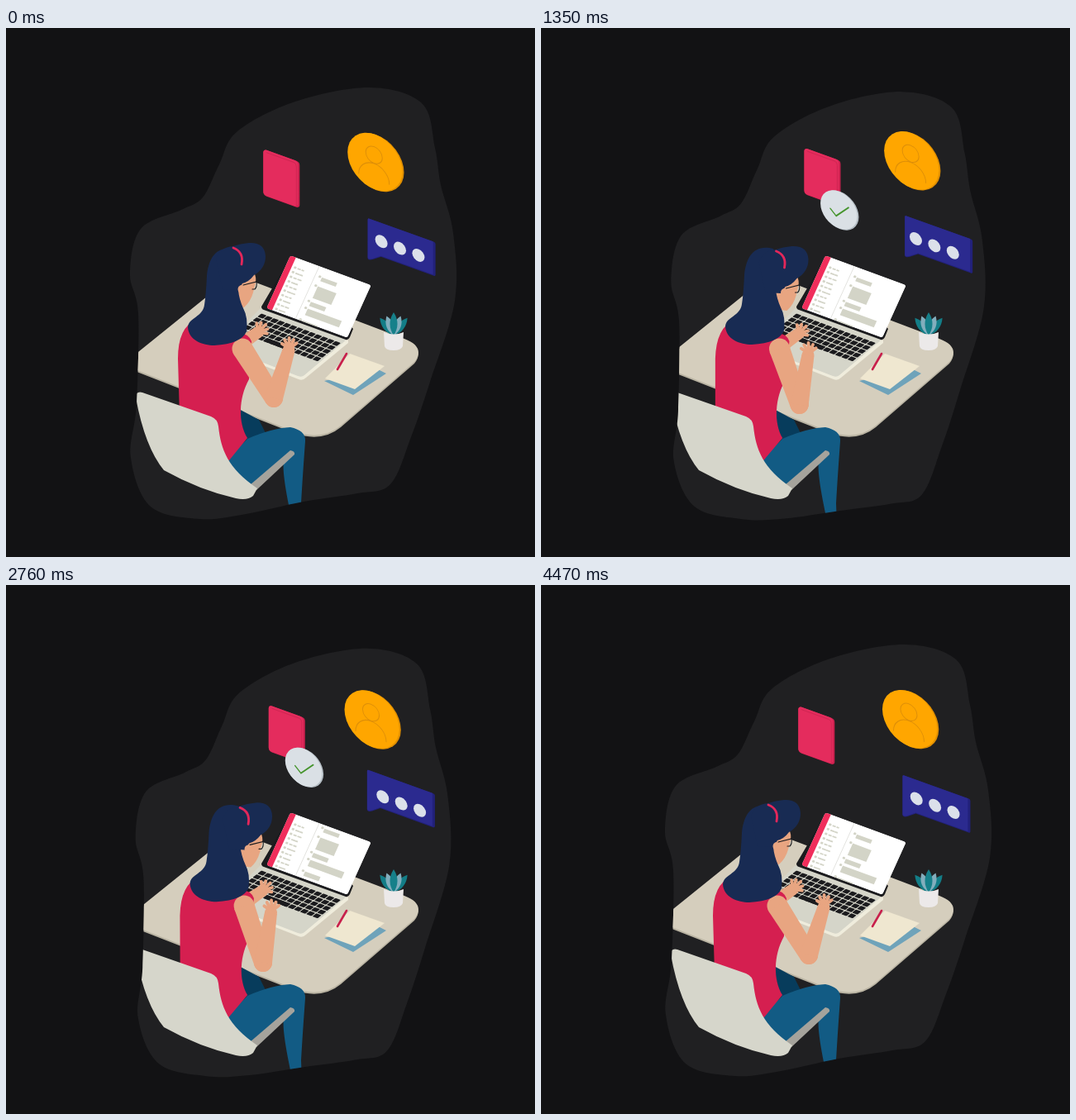
Write an HTML page with a canvas that moves like this. It is 640 px wide and 640 px high and loops after 4530 ms.

```html
<!DOCTYPE html>
<html lang="en">
<head>
<meta charset="utf-8">
<title>Working at a desk</title>
<style>
html, body { margin: 0; width: 100%; height: 100%; overflow: hidden; background: #121214; }
canvas { display: block; width: 640px; height: 640px; }
</style>
</head>
<body>
<canvas id="stage" width="640" height="640"></canvas>
<script>
const ctx = document.getElementById('stage').getContext('2d');
const LOOP = 4530, STEP = 30, LAST = 4470, SLOPE = 0.36;
const SKIN = '#e8a581', HAIR = '#182b53', CRIMSON = '#d51f50', GREY = '#d3d4c7', DARK = '#1b1b1e';

const mix = (a, b, x) => a + (b - a) * x;
const ease = (t, from, to) => {
  const x = Math.max(0, Math.min(1, (t - from) / (to - from)));
  return x * x * (3 - 2 * x);
};
const pulse = (t, a, b, c, d) => ease(t, a, b) - ease(t, c, d);
const drift = (t, peak) => Math.cos(2 * Math.PI * (t - peak) / LOOP);
const soft = x => (x + (1 - Math.cos(Math.PI * x)) / 2) / 2;
const swell = t => t < 1950 ? soft((t / 1950) ** 0.8) : soft((LAST - t) / (LAST - 1950));

function fill(path, color) {
  ctx.fillStyle = color;
  ctx.fill(new Path2D(path));
}
function stroke(path, color, width = 1) {
  ctx.strokeStyle = color;
  ctx.lineWidth = width;
  ctx.stroke(new Path2D(path));
}
function disc(x, y, r, color) {
  ctx.fillStyle = color;
  ctx.beginPath();
  ctx.arc(x, y, r, 0, 7);
  ctx.fill();
}
function rect(x, y, w, h, color, r = 0) {
  ctx.fillStyle = color;
  ctx.beginPath();
  ctx.roundRect(x, y, w, h, r);
  ctx.fill();
}
function layer(draw) {
  ctx.save();
  draw();
  ctx.restore();
}
function shifted(x, y, draw) {
  layer(() => { ctx.translate(x, y); draw(); });
}
// Places a flat drawing on the slanted plane of the floating items.
function slanted(x, y, draw, scale = 1) {
  if (scale <= 0) return;
  layer(() => {
    ctx.transform(scale, SLOPE * scale, 0, scale, x, y);
    draw();
  });
}

const OUTLINE = [[440, 72], [503, 91], [519, 145], [526, 190], [541, 248], [543, 330], [513, 428], [490, 495],
  [465, 552], [425, 563], [360, 573], [290, 588], [235, 594], [175, 579], [151, 520], [158, 455], [160, 345],
  [150, 297], [163, 243], [212, 220], [238, 205], [258, 165], [280, 125], [350, 89]];

// The blob narrows and sinks, while its lower left corner is held up.
function squeeze([x, y], w) {
  const corner = Math.exp(-((x - 205) ** 2 + (y - 590) ** 2) / 12100);
  return [x + w * ((347 - x) * 0.047 + 6 * corner), y + w * (5 + y / 50 - 18 * corner)];
}

function blobPath(w) {
  const points = OUTLINE.map(p => squeeze(p, w)), n = points.length;
  const at = i => points[(i + n) % n];
  const path = new Path2D();
  path.moveTo(...at(0));
  for (let i = 0; i < n; i++) {
    const out = k => at(i)[k] + (at(i + 1)[k] - at(i - 1)[k]) / 6;
    const into = k => at(i + 1)[k] - (at(i + 2)[k] - at(i)[k]) / 6;
    path.bezierCurveTo(out(0), out(1), into(0), into(1), ...at(i + 1));
  }
  return path;
}

function drawDesk() {
  const top = 'M130 416L274 300Q282 296 292 304L482 376Q508 386 494 404L405 481Q382 500 348 488L130 403Z';
  shifted(0, 2, () => fill(top, '#b9b3a2'));
  fill(top, '#d5cebd');
}

function drawScreen(scroll) {
  fill('M343 279L309 337Q309 340 312 341L411 377Q414 378 416 374L420 364Z', DARK);
  layer(() => {
    ctx.transform(0.98, 0.36, -0.29, 0.64, 344, 275);
    ctx.beginPath();
    ctx.roundRect(0, 0, 100, 100, 4);
    ctx.clip();
    rect(0, 0, 100, 100, '#ffffff');
    rect(0, 0, 7, 100, '#f02e5c');
    rect(35.5, 0, 0.8, 100, '#dfdfdb');
    for (let i = 0; i < 10; i++) {
      const y = 15 + i * 8.7;
      rect(9.5, y, 3, 4, GREY, 1);
      rect(14, y + 1, 4 + i % 2, 2.5, GREY);
      rect(19, y + 1, 3 + i % 3, 2.5, GREY);
    }
    ctx.translate(0, -scroll);
    [[17, 19, 7], [34, 23, 22], [63, 19, 8], [76, 42, 12], [98, 19, 8]].forEach(([y, w, h]) => {
      rect(40, y - 2, 3, 4, GREY, 1);
      rect(44, y, w, h, GREY);
    });
  });
}

function drawLaptop(scroll) {
  fill('M308 340L414 378V381L363 423Q359 427 354 425L262 389V384Z', '#efecdc');
  fill('M308 339L412 377L361 420Q358 423 353 421L262 386Z', '#d5d5c9');
  layer(() => {
    ctx.transform(97 / 13, 36 / 13, -29 / 5, 23 / 5, 309, 345);
    for (let row = 0; row < 5; row++) {
      for (let col = 0; col < 13; col++) rect(col + 0.06, row + 0.08, 0.86, 0.82, DARK, 0.12);
    }
    rect(4.06, 4.08, 3.86, 0.82, DARK, 0.12);
  });
  drawScreen(scroll);
}

function drawPlant() {
  const leaf = (degrees, length, color) => shifted(469, 372, () => {
    ctx.rotate(degrees * Math.PI / 180);
    fill(`M0 0Q-9 ${-length / 2} 0 ${-length}Q9 ${-length / 2} 0 0Z`, color);
  });
  for (const side of [-1, 1]) {
    leaf(38 * side, 27, '#137d87');
    leaf(20 * side, 25, '#82aebd');
  }
  leaf(0, 28, '#16808a');
  fill('M457 368Q469 373 481 368L480 385Q478 390 469 390Q459 390 458 385Z', '#ece9e9');
}

function drawPapers() {
  fill('M385 427L420 444L460 418L448 412Z', '#6fa3ba');
  fill('M416 394L458 409L422 437L386 424Z', '#efe7d0');
  stroke('M412 394L401 413', '#c8204c', 2.6);
}

function limb(x1, y1, r1, x2, y2, r2) {
  const a = Math.atan2(y2 - y1, x2 - x1), nx = -Math.sin(a), ny = Math.cos(a);
  disc(x1, y1, r1, SKIN);
  disc(x2, y2, r2, SKIN);
  fill(`M${x1 + nx * r1} ${y1 + ny * r1}L${x2 + nx * r2} ${y2 + ny * r2}`
    + `L${x2 - nx * r2} ${y2 - ny * r2}L${x1 - nx * r1} ${y1 - ny * r1}Z`, SKIN);
}
// Fans five fingers out around a main direction.
function fingers(x, y, direction) {
  for (let i = -2; i <= 2; i++) {
    const a = (direction + i * 27) * Math.PI / 180, length = 13 - Math.abs(i);
    stroke(`M${x} ${y}l${length * Math.cos(a)} ${length * Math.sin(a)}`, SKIN, 3.8);
  }
}

function drawFarHand(lean) {
  const x = 305 + 6.5 * lean, y = 368 + 2 * lean;
  limb(x - 16, y + 11, 8, x, y, 7);
  fingers(x, y, -45);
}

function drawNearArm(t, lean) {
  const lift = pulse(t, 950, 1450, 2800, 3250);
  const elbowX = mix(324 + 2.5 * lean, 311, lift), elbowY = mix(448, 457, lift);
  const wristX = mix(343 + 2.5 * lean, 321.5, lift), wristY = mix(388 + lean, 394.5, lift);
  limb(286 + 2.5 * lean, 388, 12.5, elbowX, elbowY, 11);
  limb(elbowX, elbowY, 11, wristX - 1, wristY + 2, 7.5);
  fingers(wristX, wristY, -92);
}

function drawLegs() {
  fill('M280 460L306 474L314 490L290 498Z', '#073c5c');
  fill('M266 523L292 497Q322 484 344 483Q363 487 362 500Q359 540 357 575L358 602H347L341 572Q334 535 336 524L296 555Z', '#125b84');
}

function drawTorso(lean) {
  layer(() => {
    const shear = lean / 35;
    ctx.transform(1, 0, -shear, 1, shear * 500, 0);
    fill('M230 353Q208 362 208 400L210 470L250 520L270 523L292 496C281 478 281 448 294 425L297 379Q294 370 280 368Z', CRIMSON);
  });
}

function drawChair() {
  fill('M295 553L344 511Q350 512 349 516L303 559Z', '#a5a39c');
  fill('M157 447Q157 439 165 441L248 470Q256 473 257 482C260 510 268 532 304 557L299 566Q292 572 278 569Q234 559 191 535Q168 507 157 447Z', '#d6d6cb');
}

// The head leans forward further than the hair falling down the back.
function drawHead(lean) {
  shifted(9.5 * lean, 4 * lean, () => {
    fill('M270 315L300 296Q303 301 302 308L299 320Q296 331 288 338L272 336Z', SKIN);
  });
  shifted(3 * lean, -lean, () => {
    fill('M278 268C254 262 245 279 243 300Q242 322 240 335C238 350 221 350 220 362C221 378 238 384 252 384'
      + 'Q285 382 291 367Q293 350 287 339Q282 328 281 317L290 300Z', HAIR);
  });
  shifted(9.5 * lean, 4 * lean, () => {
    fill('M275 264Q258 265 254 280L262 316L281 317L286 309Q294 307 300 299Q314 291 314 276Q313 259 294 260Q283 261 275 264Z', HAIR);
    disc(285.5, 316, 5, SKIN);
    stroke('M287 311L303 307Q304 313 301 316L298 316', DARK, 1.1);
    stroke('M275 266Q288 271 285 286', '#e3275a', 2.8);
  });
}

function drawCard(x, y) {
  slanted(x, y, () => {
    rect(0, 0, 44, 56, '#c9204e', 4);
    rect(0, 0, 42, 55.5, '#e42c5d', 4);
    stroke('M4 3H37Q40 3 40 7V55', '#c9244f', 0.7);
  });
}

function drawCoin(x, y) {
  slanted(x, y, () => {
    disc(0.8, 0, 33.5, '#df8e00');
    disc(-0.8, 0, 33.2, '#ffa600');
    ctx.strokeStyle = '#de8f08';
    ctx.lineWidth = 1;
    ctx.beginPath();
    ctx.arc(-2, -8, 10, 0, 7);
    ctx.moveTo(-20.5, 21);
    ctx.arc(-2, 21, 18.5, Math.PI, 0);
    ctx.stroke();
  });
}

function drawChat(t) {
  slanted(438 + 2.2 * drift(t, 1250), 226.6 - 3.5 * drift(t, 2500), () => {
    fill('M0 2Q0 0 2 0H80Q82 0 82 2V39Q82 41 80 41H16L6 48Q1 51 0 49Z', '#22217a');
    fill('M0 2Q0 0 2 0H79V40H16L6 47Q1 50 0 48Z', '#2b2a8f');
  });
  const x = 454.6 + 1.4 * drift(t, 3150), y = 256.7 - 2 * drift(t, 1800);
  for (let i = 0; i < 3; i++) slanted(x + i * 22.4, y + i * 8.3, () => disc(0, 0, 7.5, '#dbe0ea'));
}

function drawCheck(x, y, scale) {
  slanted(x, y, () => {
    disc(0.7, 0, 22.7, '#b4bdc4');
    disc(-0.7, 0, 22.3, '#dae0e5');
    stroke('M-11 2L-4 8.5L11 -7', '#45942c', 1.6);
  }, scale);
}

function drawScene(t) {
  const morph = swell(t), lean = pulse(t, 0, 1250, 2200, LAST), blob = blobPath(morph);

  ctx.lineCap = 'round';
  ctx.fillStyle = '#121214';
  ctx.fillRect(0, 0, 640, 640);
  ctx.fillStyle = '#202022';
  ctx.fill(blob);

  layer(() => {
    ctx.clip(blob);
    drawDesk();
    drawLaptop(11 * pulse(t, 2200, 2500, 2950, 3250));
    drawPlant();
    drawPapers();
    drawFarHand(lean);
    drawLegs();
    drawTorso(lean);
    drawNearArm(t, lean);
    drawHead(lean);
    drawChair();
  });

  drawCard(311.3 + 9 * morph, 146.3 - 1.8 * morph);
  drawCoin(446.3 + 3.4 * drift(t, 930), 162.1 - 1.5 * drift(t, 1250));
  slanted(467, 196, () => disc(0, 0, 10, CRIMSON), pulse(t, 1350, 1600, 2150, 2400));
  drawChat(t);
  drawCheck(357.5 + 4.5 * morph, 222.3 - 2 * lean, pulse(t, 500, 750, 3500, 3750));
}

const start = performance.now();
function frame() {
  const t = (performance.now() - start) % LOOP;
  drawScene(Math.min(Math.floor(t / STEP) * STEP, LAST));
  requestAnimationFrame(frame);
}
frame();
</script>
</body>
</html>
```
